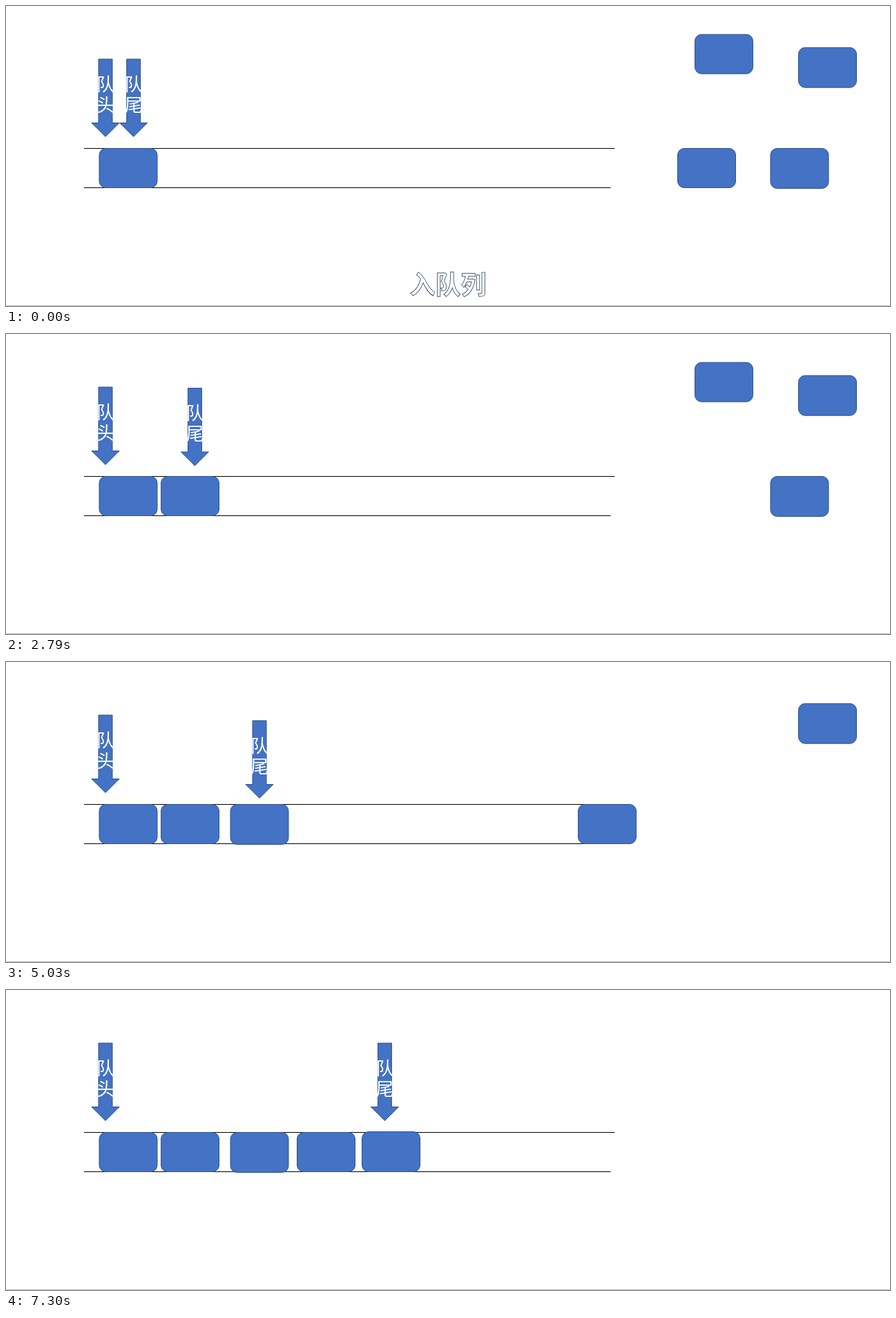
Animation, 1280 px wide and 435 px high, one loop 8.09 s. Source, as an HTML page:

```html
<!DOCTYPE html>
<html lang="zh-CN">
<head>
<meta charset="utf-8">
<title>入队列</title>
<style>
html, body { margin: 0; width: 100%; height: 100%; overflow: hidden; background: #fff; }
svg { display: block; width: 1280px; height: 435px; }
.shape { fill: #4472c4; stroke: #2f528f; stroke-width: 1; }
.rail { stroke: #000; stroke-width: 1; }
text { font-family: "Noto Sans CJK SC", "Noto Sans CJK", sans-serif; text-anchor: middle; }
.label { font-size: 26px; font-weight: 300; fill: #fff; }
.title { font-size: 37px; font-weight: 700; fill: #fff; stroke: #44546a; stroke-width: 0.9; }
</style>
</head>
<body>
<svg id="stage" viewBox="0 0 1280 435">
  <path class="rail" d="M113 206.5H881.5M113 263.5H875.5"/>
  <path d="M0 434.5H1280" stroke="#bfbfbf"/>
</svg>
<script>
const LOOP = 8090;
const TITLE_END = 130;
const LANE = 206;
const ARROW_TOP = 76.5;
const stage = document.getElementById('stage');

function add(tag, attrs, parent = stage, text = '') {
  const el = document.createElementNS('http://www.w3.org/2000/svg', tag);
  for (const key in attrs) el.setAttribute(key, attrs[key]);
  el.textContent = text;
  return parent.appendChild(el);
}

function place(el, x, y) {
  el.setAttribute('transform', `translate(${x} ${y})`);
}

function makeBlock(height = 57) {
  return add('rect', { class: 'shape', x: 0.5, y: 0.5, width: 84, height, rx: 9.5 });
}

// Arrow with its origin at the top centre of the shaft
function makeArrow(chars) {
  const g = add('g', {});
  add('path', { class: 'shape', d: 'M-10 .5H10V93H20L0 113L-20 93H-10Z' }, g);
  [...chars].forEach((c, i) => add('text', { class: 'label', x: 0, y: 46 + 30 * i }, g, c));
  return g;
}

// A block waits at home, appears at the gate, then docks and calls the tail arrow over it
const blocks = [
  { home: [972, LANE], gate: { at: 1190, x: 820, y: LANE },
    midway: { at: 1850, x: 568, y: LANE },
    dock: { at: 2790, x: 224, y: LANE }, tail: [273.4, 78] },
  { home: [1106.5, LANE], height: 58, gate: { at: 3450, x: 795, y: 208 },
    dock: { at: 4370, x: 324.5, y: LANE }, tail: [367, 84.5] },
  { home: [997, 40.7], gate: { at: 5030, x: 828, y: LANE },
    dock: { at: 5710, x: 421, y: LANE }, tail: [463.5, 78] },
  { home: [1147, 59.7], height: 58, gate: { at: 6510, x: 773, y: 208 },
    dock: { at: 7300, x: 515, y: 205 }, tail: [548.4, ARROW_TOP] }
];

place(makeBlock(), 134.5, LANE);
for (const b of blocks) b.el = makeBlock(b.height);
place(makeArrow('队头'), 144, ARROW_TOP);
const tail = makeArrow('队尾');
const title = add('text', { class: 'title', x: 640, y: 418 }, stage, '入队列');

function draw(t) {
  let tailSpot = [184.7, ARROW_TOP];
  for (const { el, home, gate, midway, dock, tail: spot } of blocks) {
    const stop = [dock, midway, gate].find(s => s && t >= s.at);
    place(el, ...(stop ? [stop.x, stop.y] : home));
    if (stop === dock) tailSpot = spot;
  }
  place(tail, ...tailSpot);
  title.setAttribute('visibility', t < TITLE_END ? 'visible' : 'hidden');
}

let start;
function tick(now) {
  start ??= now;
  draw(Math.max(0, now - start) % LOOP);
  requestAnimationFrame(tick);
}
draw(0);
requestAnimationFrame(tick);
</script>
</body>
</html>
```
